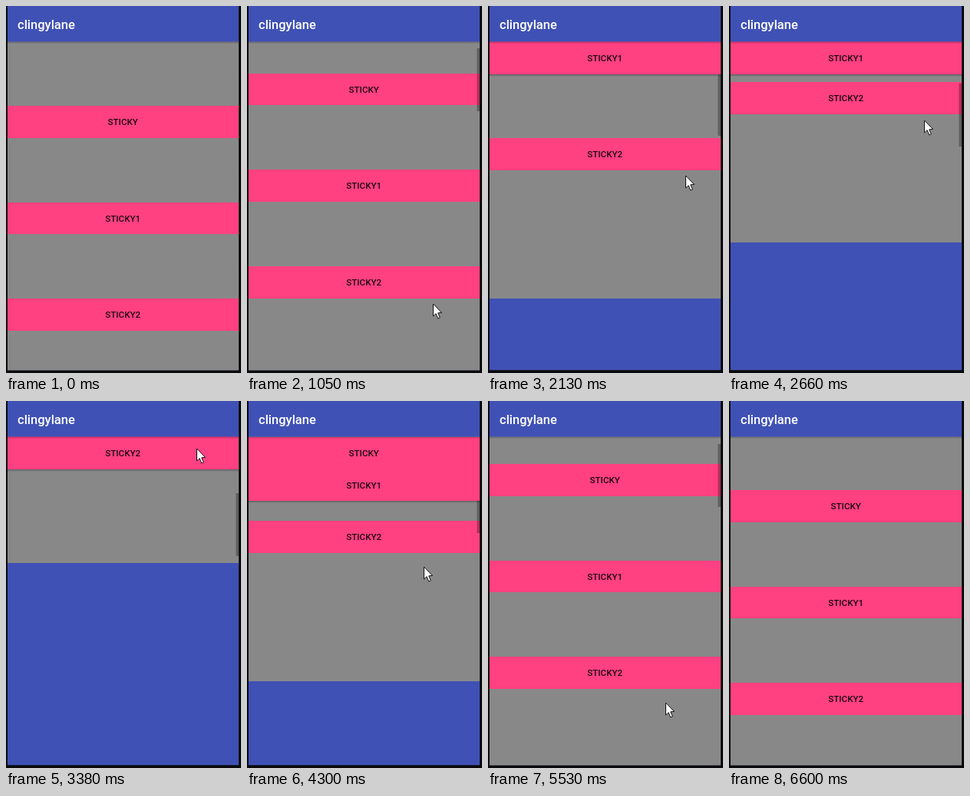
These frames come from a looping animation (306 px wide and 478 px high, 6.77 s). An HTML page with a canvas:

```html
<!DOCTYPE html>
<html lang="en">
<head>
<meta charset="utf-8">
<title>Pinned rows</title>
<style>
html, body { margin: 0; width: 100%; height: 100%; overflow: hidden; background: #000; }
canvas { display: block; width: 306px; height: 478px; }
</style>
</head>
<body>
<canvas id="stage" width="306" height="478"></canvas>
<script>
const ctx = document.getElementById('stage').getContext('2d');
const LOOP = 6770, STEP = 77;
const BLUE = '#3f51b5', PINK = '#ff4081', GRAY = '#888888', INK = '#1c0a10';
const LEFT = 2, WIDTH = 301, BAR = 46.5, TOP = 47, BOTTOM = 474.5;
const ROW = 41.6, GAP = 83.2, PITCH = 125.6, END = 543.2;
const LABELS = ['STICKY', 'STICKY1', 'STICKY2'];

// Scroll range, pointer height minus scroll for each drag, and the turning time.
const FULL = 379.2, REST = 14, GRIP_UP = 430.5, GRIP_DOWN = 441.2, TURN = 3300;

// The picture updates in steps during these spans and holds between them.
const SPANS = [[70, 360], [590, 3210], [3380, 6600]];

// Pointer path: time, x, y.
const PATH = [
  [0, 250, 482], [360, 240, 443], [590, 239.5, 440], [1050, 242, 388.5],
  [2130, 257, 221.6], [3210, 250, 51.3], [3380, 248, 62],
  [4300, 230, 216], [4910, 217, 314], [6220, 246, 482], [LOOP, 246, 482]
];

const clamp = (v, lo, hi) => Math.min(hi, Math.max(lo, v));

function snap(t) {
  let at = 0;
  for (const [start, end] of SPANS) {
    if (t < start) break;
    const step = (end - start) / Math.round((end - start) / STEP);
    at = Math.min(end, start + step * Math.floor((t - start + 6) / step));
  }
  return at;
}

function pointerAt(t) {
  const i = Math.max(1, PATH.findIndex(p => p[0] >= t));
  const [t0, x0, y0] = PATH[i - 1], [t1, x1, y1] = PATH[i];
  const k = (t - t0) / (t1 - t0);
  return { x: x0 + (x1 - x0) * k, y: y0 + (y1 - y0) * k };
}

// Going up each row pushes the last one away; coming back the rows stack.
function placeRows([a, b, c], returning) {
  const last = Math.max(c, 0);
  if (returning) {
    const base = Math.min(0, last - 2 * ROW);
    return [Math.max(a, base), Math.max(b, base + ROW), last];
  }
  const mid = Math.min(Math.max(b, 0), last - ROW);
  return [Math.min(Math.max(a, 0), mid - ROW), mid, last];
}

function fill(color, x, y, w, h) {
  ctx.fillStyle = color;
  ctx.fillRect(x, y, w, h);
}

// A full-width band with its edges on whole pixels.
function band(color, y, h) {
  const top = Math.round(TOP + y);
  fill(color, LEFT, top, WIDTH, Math.round(TOP + y + h) - top);
}

function text(str, x, y, size, color, align) {
  ctx.font = `500 ${size}px Roboto, "Open Sans", sans-serif`;
  ctx.textAlign = align;
  ctx.fillStyle = color;
  ctx.fillText(str, x, y);
}

function shadow(y, strength) {
  const g = ctx.createLinearGradient(0, y, 0, y + 3);
  g.addColorStop(0, `rgba(0,0,0,${strength})`);
  g.addColorStop(1, 'rgba(0,0,0,0)');
  fill(g, LEFT, y, WIDTH, 3);
}

function drawRow(i, y) {
  band(PINK, y, ROW);
  text(LABELS[i], 152.2, Math.round(TOP + y) + 25, 11.6, INK, 'center');
}

function drawPointer({ x, y }) {
  ctx.save();
  ctx.translate(Math.round(x) + 0.5, Math.round(y));
  const arrow = new Path2D('M0 0V16L3.6 12.7L6.2 19L8.8 17.9L6.2 11.8L11 11.4Z');
  ctx.fillStyle = '#fff';
  ctx.fill(arrow);
  ctx.strokeStyle = '#111';
  ctx.stroke(arrow);
  ctx.restore();
}

function draw(t) {
  const pointer = pointerAt(t);
  const returning = t > TURN;
  const scroll = returning
    ? clamp(GRIP_DOWN - pointer.y, REST, FULL)
    : clamp(GRIP_UP - pointer.y, 0, FULL);
  const natural = LABELS.map((_, i) => GAP + i * PITCH - scroll);
  const placed = placeRows(natural, returning);
  const stuck = placed.map((y, i) => y > natural[i]);
  const drawRows = pinned => placed.forEach((y, i) => {
    if (stuck[i] === pinned) drawRow(i, y);
  });

  fill('#0a0a0c', 0, 0, 306, 478);
  ctx.save();
  ctx.beginPath();
  ctx.rect(LEFT, 0, WIDTH, BOTTOM);
  ctx.clip();

  fill(BLUE, LEFT, 0, WIDTH, BOTTOM);
  band(GRAY, -1, END + 1 - scroll);
  drawRows(false);

  if (scroll > 0) {
    const alpha = 0.3 * clamp((6590 - t) / 250, 0, 1);
    fill(`rgba(0,0,0,${alpha})`, 299.5, Math.round(TOP + scroll * 0.192), 3.5, 82);
  }

  const pinned = placed.filter((_, i) => stuck[i]);
  if (pinned.length) shadow(Math.round(TOP + Math.max(...pinned) + ROW), 0.3);
  drawRows(true);

  shadow(BAR, 0.25);
  fill(BLUE, LEFT, 0, WIDTH, BAR);
  text('clingylane', 15, 29.6, 16.5, '#fff', 'left');
  ctx.restore();

  drawPointer(pointer);
}

function tick() {
  draw(snap(performance.now() % LOOP));
  requestAnimationFrame(tick);
}
tick();
</script>
</body>
</html>
```
